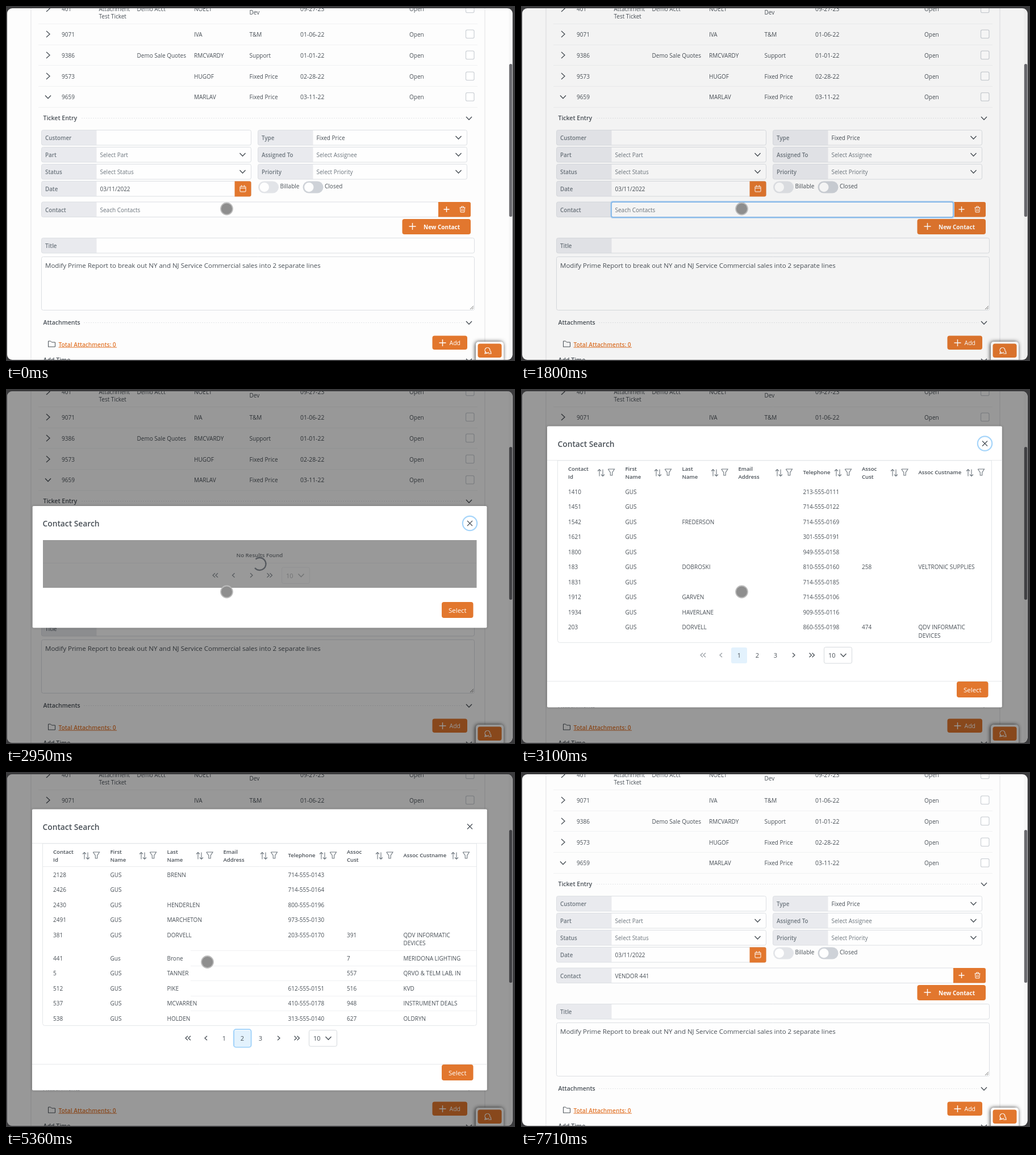
Recreate the animation shown at these times as an HTML page with a canvas. Size 896 by 625 pixels, loop 7.96 s.

```html
<!DOCTYPE html>
<html lang="en">
<head>
<meta charset="utf-8">
<title>Contact search</title>
<style>
html, body { margin: 0; width: 100%; height: 100%; overflow: hidden; background: #3b3b3d; }
canvas { display: block; width: 896px; height: 625px; }
</style>
</head>
<body>
<canvas id="stage"></canvas>
<script>
const W = 896, H = 625, LOOP = 7960;
const canvas = document.getElementById('stage');
const dpr = window.devicePixelRatio || 1;
canvas.width = W * dpr;
canvas.height = H * dpr;
const c = canvas.getContext('2d');

const FAMILY = '"Open Sans", "Noto Sans", sans-serif';
const INK = '#495057', MUTED = '#6c757d', ORANGE = '#e2772e', EDGE = '#dcdfe3';
const LABEL = '#e9eaee', RING = '#a6d5fa', PICK = '#e3f2fd';

// Text is placed by the vertical middle of its capitals.
function text(s, x, y, { size = 10, weight = 400, color = INK, align = 'left' } = {}) {
  c.font = `${weight} ${size}px ${FAMILY}`;
  c.fillStyle = color;
  c.textAlign = align;
  c.fillText(s, x, y + size * 0.36);
}

function box(x, y, w, h, r, fill, stroke, width = 1) {
  c.beginPath();
  c.roundRect(x, y, w, h, r);
  if (fill) { c.fillStyle = fill; c.fill(); }
  if (stroke) { c.strokeStyle = stroke; c.lineWidth = width; c.stroke(); }
}

function disc(x, y, r, fill) {
  c.beginPath();
  c.arc(x, y, r, 0, Math.PI * 2);
  c.fillStyle = fill;
  c.fill();
}

// Each part is a flat list of points relative to (x, y).
function strokes(x, y, parts, color = INK, width = 1.2) {
  c.beginPath();
  for (const p of parts) {
    c.moveTo(x + p[0], y + p[1]);
    for (let i = 2; i < p.length; i += 2) c.lineTo(x + p[i], y + p[i + 1]);
  }
  c.strokeStyle = color;
  c.lineWidth = width;
  c.stroke();
}

const hline = (x1, x2, y, color) => strokes(0, y, [[x1, 0, x2, 0]], color, 1);
const chevronDown = (x, y, color) => strokes(x, y, [[-5, -2.5, 0, 2.7, 5, -2.5]], color, 1.4);
const chevronRight = (x, y) => strokes(x, y, [[-3, -5.5, 3, 0, -3, 5.5]], INK, 1.3);
const plus = (x, y, r) => strokes(x, y, [[-r, 0, r, 0], [0, -r, 0, r]], '#fff', 1.4);

function dotted(x1, x2, y) {
  c.setLineDash([2, 2]);
  hline(x1, x2, y, '#e4e6e8');
  c.setLineDash([]);
}

function section(title, y, lineStart) {
  text(title, 65.5, y, { size: 10.5, weight: 600 });
  dotted(lineStart, 806, y + 0.5);
  chevronDown(815, y + 0.5);
}

function field(label, x, y, w, { value = '', hint = '', arrow = false } = {}) {
  box(x, y, w, 26.5, 3, '#fefefe');
  box(x, y, 97, 26.5, [3, 0, 0, 3], LABEL);
  box(x, y, w, 26.5, 3, null, EDGE);
  text(label, x + 6.5, y + 14.3, { size: 9.8, weight: 600, color: MUTED });
  text(value || hint, x + 103, y + 14.3, { color: value ? INK : MUTED });
  if (arrow) chevronDown(x + w - 15, y + 13);
}

function toggle(label, x, fill, textX) {
  box(x, 308.5, 36, 21, 10.5, fill);
  disc(x + 10.8, 319, 8.2, '#fefefe');
  text(label, textX, 317);
}

const tickets = [
  ['9071', '', 'IVA', 'T&M', '01-06-22', 50],
  ['9386', 'Demo Sale Quotes', 'RMCVARDY', 'Support', '01-01-22', 87],
  ['9573', '', 'HUGOF', 'Fixed Price', '02-28-22', 124],
  ['9659', '', 'MARLAV', 'Fixed Price', '03-11-22', 160.5],
];

function ticketRow([id, customer, user, type, date, y]) {
  text(id, 98, y);
  text(customer, 230.5, y);
  text(user, 331, y);
  text(type, 428.5, y);
  text(date, 518, y, { size: 10.4 });
  text('Open', 710, y);
  box(809.5, y - 7.8, 14.5, 14.5, 2.5, '#fff', '#cfd3d8', 1.3);
}

function drawTickets() {
  ticketRow(['401', 'Demo Acct', 'NOELT', '', '09-27-23', 5]);
  text('Attachment', 163.5, 5);
  text('Test Ticket', 163.5, 18.5);
  text('Dev', 428.5, 11.5);
  chevronRight(74, 4.5);
  tickets.forEach((row, i) => {
    ticketRow(row);
    if (i < 3) chevronRight(74, row[5] - 0.5);
    else chevronDown(74, 160);
  });
  for (let i = 0; i < 5; i++) hline(57, 830, 31.5 + Math.round(i * 36.7), '#f1f2f3');
}

function drawForm(contact) {
  section('Ticket Entry', 197, 133);
  field('Customer', 62.5, 218.5, 369);
  field('Part', 62.5, 248.5, 369, { hint: 'Select Part', arrow: true });
  field('Status', 62.5, 278.5, 369, { hint: 'Select Status', arrow: true });
  field('Date', 62.5, 308.5, 369, { value: '03/11/2022' });
  field('Type', 443.5, 218.5, 368, { value: 'Fixed Price', arrow: true });
  field('Assigned To', 443.5, 248.5, 368, { hint: 'Select Assignee', arrow: true });
  field('Priority', 443.5, 278.5, 368, { hint: 'Select Priority', arrow: true });

  box(402.5, 308.5, 29, 27, [0, 3, 3, 0], ORANGE);
  box(412, 317.5, 10, 9.5, 1, null, '#fff');
  strokes(417, 317.5, [[-5, 3, 5, 3], [-2.5, -2, -2.5, 1], [2.5, -2, 2.5, 1]], '#fff', 1);

  toggle('Billable', 444, '#e2e4e8', 482.5);
  toggle('Closed', 522.5, '#ced2d8', 561);

  field('Contact', 62.5, 345, 699, contact);
  box(761, 345, 57, 26.5, [0, 3, 3, 0], ORANGE);
  plus(775.5, 358, 5);
  strokes(803.5, 358, [[-5, -3, 5, -3], [-4, -3, -3.3, 5, 3.3, 5, 4, -3],
    [-2, -3, -2, -5, 2, -5, 2, -3], [-1.3, -0.5, -1.3, 3], [1.3, -0.5, 1.3, 3]], '#fff', 1);
  box(697.5, 375, 120.5, 27, 4, ORANGE);
  plus(715.5, 388, 6);
  text('New Contact', 735, 389.5, { weight: 700, color: '#fff' });

  field('Title', 62.5, 408.5, 762);
  box(62.5, 441.5, 762, 94, 3, '#fefefe', EDGE);
  text('Modify Prime Report to break out NY and NJ Service Commercial sales into 2 separate lines',
    69, 457, { size: 11.5 });
  strokes(823, 534, [[-6, 0, 0, -6], [-3, 0, 0, -3]], '#777', 1);

  section('Attachments', 557, 137);
  strokes(80.5, 595, [[-6, 5, -6, -5, -2, -5, 0, -3, 6, -3, 6, 5, -6.5, 5]], INK, 1);
  text('Total Attachments: 0', 92.5, 596, { size: 10.2, weight: 600, color: ORANGE });
  hline(92.5, 195, 601, ORANGE);
  box(750.5, 580.5, 61.5, 24.5, 4, ORANGE);
  plus(768.5, 593, 6);
  text('Add', 780.5, 593.5, { size: 10.5, color: '#fff' });
  section('Add Time', 623, 121);
}

function drawChat() {
  c.save();
  c.shadowColor = 'rgba(0,0,0,.75)';
  c.shadowBlur = 7 * dpr;
  c.shadowOffsetX = -1 * dpr;
  box(827, 591, 49, 38, 5, '#fff');
  c.restore();
  box(830.5, 594.5, 42, 24.5, 4, ORANGE);
  c.beginPath();
  c.arc(847.5, 606, 4.5, 0.9, Math.PI * 2 + 0.3);
  c.strokeStyle = '#fff';
  c.lineWidth = 1.2;
  c.stroke();
  strokes(848, 607, [[-4, 1.5, -5, 5, 0, 4], [1, 5, 6, 5, 5, 0]], '#fff');
}

function drawInputFocus(t) {
  if (t < 550 || t >= 1920) return;
  c.globalAlpha = t < 680 ? 0.5 : 1;
  box(158.5, 344.5, 603, 28, 3, null, '#bfdcf8', 3);
  box(159.2, 345.2, 601.6, 26.6, 2.5, null, '#80b9f0', 1.4);
  c.globalAlpha = 1;
  const typing = t >= 1390 && t < 1800;
  if (t < 1100 || typing) {
    c.font = `400 10px ${FAMILY}`;
    const x = 165.8 + (typing ? c.measureText(typed(t)).width : 0);
    strokes(x, 358, [[0, -6.5, 0, 6.5]], '#333', 1);
  }
}

const typed = t => 'gus'.slice(0, t < 1510 ? 1 : t < 1660 ? 2 : 3);

function contactValue(t) {
  if (t >= 1390 && t < 1800) return { value: typed(t) };
  if (t >= 6540) return { value: 'VENDOR 441' };
  return { hint: 'Seach Contacts' };
}

function dialogFrame(x, y, w, h, titleY, buttonY, focused) {
  c.save();
  c.shadowColor = 'rgba(0,0,0,.25)';
  c.shadowBlur = 4 * dpr;
  box(x, y, w, h, 2, '#fff');
  c.restore();
  text('Contact Search', 64.5, titleY, { size: 13.8, weight: 600 });
  if (focused) box(803.8, titleY - 13.7, 25.4, 25.4, 12.7, null, RING, 2.2);
  strokes(816.5, titleY - 1, [[-4.5, -4.5, 4.5, 4.5], [4.5, -4.5, -4.5, 4.5]], INK, 1.2);
  box(767, buttonY, 55.5, 28, 4, ORANGE);
  text('Select', 794.8, buttonY + 14.5, { size: 11.5, color: '#fff', align: 'center' });
}

// dir is -1 for left and 1 for right; count is the number of angles.
function pager(x, y, dir, count, color = MUTED) {
  for (let i = 0; i < count; i++) {
    const d = (i - (count - 1) / 2) * 5;
    strokes(x + d, y, [[-2 * dir, -3.7, 2 * dir, 0, -2 * dir, 3.7]], color, 1.3);
  }
}

function pageSize(x, y) {
  box(x, y, 49, 28.5, 3, null, '#d5d9dd');
  text('10', x + 7.5, y + 15, { size: 11 });
  chevronDown(x + 34, y + 14);
}

function drawLoading(t) {
  dialogFrame(46.7, 206, 799.8, 214.5, 237.5, 375, true);
  text('No Results Found', 446.5, 293, { size: 9.7, weight: 600, align: 'center' });
  hline(65, 828, 306.5, '#eceef0');
  [[368.5, -1, 2], [400.5, -1, 1], [432, 1, 1], [464, 1, 2]].forEach(([x, d, n]) => pager(x, 328, d, n));
  c.globalAlpha = 0.5;
  pageSize(485.5, 314);
  c.globalAlpha = 1;
  box(65, 266, 763.5, 84, 0, 'rgba(255,255,255,.25)');
  box(65, 266, 763.5, 84, 0, 'rgba(0,0,0,.4)');
  const step = Math.floor((t - 1920) / 125) * 0.125;
  const gap = 0.09 + step * Math.PI;
  c.beginPath();
  c.arc(446.5, 308, 11, gap + Math.PI / 4, gap + Math.PI * 1.75);
  c.strokeStyle = '#55595e';
  c.lineWidth = 2.3;
  c.stroke();
}

// Label, text x, sort icon x, filter icon x.
const columns = [
  ['Contact|Id', 83, 141, 159], ['First|Name', 183.5, 241, 259],
  ['Last|Name', 283.5, 341, 358.5], ['Email|Address', 382.5, 454, 472],
  ['Telephone', 496.5, 558, 576], ['Assoc|Cust', 600, 657, 675.5],
  ['Assoc Custname', 699.5, 790, 810],
];

// Id, first name, last name, telephone, customer, customer name.
const pages = [`1410,GUS,,213-555-0111
1451,GUS,,714-555-0122
1542,GUS,FREDERSON,714-555-0169
1621,GUS,,301-555-0191
1800,GUS,,949-555-0158
183,GUS,DOBROSKI,810-555-0160,258,VELTRONIC SUPPLIES
1831,GUS,,714-555-0185
1912,GUS,GARVEN,714-555-0106
1934,GUS,HAVERLANE,909-555-0116
203,GUS,DORVELL,860-555-0198,474,QDV INFORMATIC|DEVICES`,
`2128,GUS,BRENN,714-555-0143
2426,GUS,,714-555-0164
2430,GUS,HENDERLEN,800-555-0196
2491,GUS,MARCHETON,973-555-0130
381,GUS,DORVELL,203-555-0170,391,QDV INFORMATIC|DEVICES
441,Gus,Brone,,7,MERIDONA LIGHTING
5,GUS,TANNER,,557,QRVO & TELM LAB; IN
512,GUS,PIKE,612-555-0151,516,KVD
537,GUS,MCVARREN,410-555-0178,948,INSTRUMENT DEALS
538,GUS,HOLDEN,313-555-0140,627,OLDRYN`]
  .map(p => p.split('\n').map(r => r.split(',')));
const cellX = [83, 183.5, 283.5, 496.5, 600, 699.5];

function drawHeader() {
  for (const [label, x, sortX, filterX] of columns) {
    const lines = label.split('|');
    lines.forEach((s, i) => text(s, x, lines.length > 1 ? 140.5 + i * 14 : 147, { size: 9.6, weight: 600 }));
    strokes(sortX, 147.5, [[-3, 6, -3, -6], [-6, -3, -3, -6, 0, -3],
      [3, -6, 3, 6], [0, 3, 3, 6, 6, 3]], MUTED, 1.1);
    strokes(filterX, 146.5, [[-5.5, -5.5, 5.5, -5.5, 1.7, 0.5, 1.7, 5.5, -1.7, 5.5, -1.7, 0.5, -5.8, -5.5]], MUTED, 1.1);
  }
}

function drawRows(rows, second, picked) {
  let y = 181;
  rows.forEach((row, i) => {
    if (second && i === 5 && picked) {
      c.globalAlpha = picked;
      box(65, y - 14, 763.5, 26.5, 0, PICK);
      c.globalAlpha = 1;
    }
    let extra = 0;
    row.forEach((cell, k) => cell.split('|').forEach((s, n) => {
      text(s.replace(';', ','), cellX[k], y + n * 14.5);
      extra = Math.max(extra, n * 14.5);
    }));
    y += 26.5 + extra;
    if (second && i > 3 && i < 9) hline(325, 828, Math.round(y - 14) + 0.5, '#f0f1f3');
  });
}

function drawResults(t) {
  const second = t >= 4450;
  dialogFrame(46, 65.5, 800.8, 495, 97, 515, t < 4330);
  hline(46, 847, 125.5, '#e6e8ea');
  hline(46, 847, 514.5, '#e6e8ea');
  box(64.5, 126, 764, 320.5, [0, 0, 4, 4], null, '#e4e7ea');
  drawHeader();
  if (second) hline(65, 828, 166.5, '#e9ebed');
  drawRows(pages[second ? 1 : 0], second, t < 5620 ? 0 : t < 5740 ? 0.5 : 1);

  const back = second ? INK : '#9aa0a6';
  pager(320.5, 468.5, -1, 2, back);
  pager(352, 468.5, -1, 1, back);
  pager(480, 468.5, 1, 1, INK);
  pager(512, 468.5, 1, 2, INK);
  box(second ? 402 : 370, 455, 28, 28, 3, PICK);
  if (t >= 4330 && t < 5620) box(401, 453, 30.5, 31.5, 4, null, RING, 2.2);
  for (let n = 1; n < 4; n++) text(n, 352 + n * 32, 469, { size: 11, align: 'center' });
  pageSize(533.5, 454.5);
}

// Pointer stops: from this time on it rests at x, y.
const stops = [
  [0, 388.5, 357], [3490, 395, 372], [3610, 425, 445], [3740, 444.5, 489.2],
  [3880, 426.5, 477.5], [4030, 422.5, 471.5], [4700, 380, 420], [4820, 335.5, 356.5],
  [4970, 338, 325], [5090, 345, 313.5], [5210, 350.5, 348.5], [5360, 354.5, 334.5],
  [7220, 366, 342], [7340, 440, 388], [7470, 560, 455], [7590, 656.5, 513.5],
];

function drawPointer(t) {
  if (t >= 7710) return;
  const [, x, y] = stops.findLast(s => s[0] <= t);
  disc(x, y, 11.4, '#bcbcbc');
  disc(x, y, 9.6, '#8e8e8e');
}

function draw(t) {
  c.setTransform(dpr, 0, 0, dpr, 0, 0);
  c.fillStyle = '#3b3b3d';
  c.fillRect(0, 0, W, H);
  c.save();
  c.beginPath();
  c.roundRect(2, 4, 889.5, 619, 9);
  c.clip();
  c.fillStyle = '#fdfdfd';
  c.fillRect(0, 0, W, H);
  c.fillStyle = '#f7f7f7';
  c.fillRect(885, 0, 8, H);
  box(885.8, 102, 5.4, 269, 2.5, '#6b6b70');
  strokes(0, 0, [[44, 0, 44, H], [843, 0, 843, H]], '#ececee', 1.6);

  drawTickets();
  drawForm(contactValue(t));
  drawInputFocus(t);
  drawChat();

  if (t >= 1800 && t < 5890) {
    c.fillStyle = `rgba(0,0,0,${t < 1920 ? 0.04 : 0.4})`;
    c.fillRect(0, 0, W, H);
    if (t >= 3100) drawResults(t);
    else if (t >= 1920) drawLoading(t);
  }
  drawPointer(t);
  c.restore();
}

const start = performance.now();
function tick() {
  draw((performance.now() - start) % LOOP);
  requestAnimationFrame(tick);
}
tick();
</script>
</body>
</html>
```
